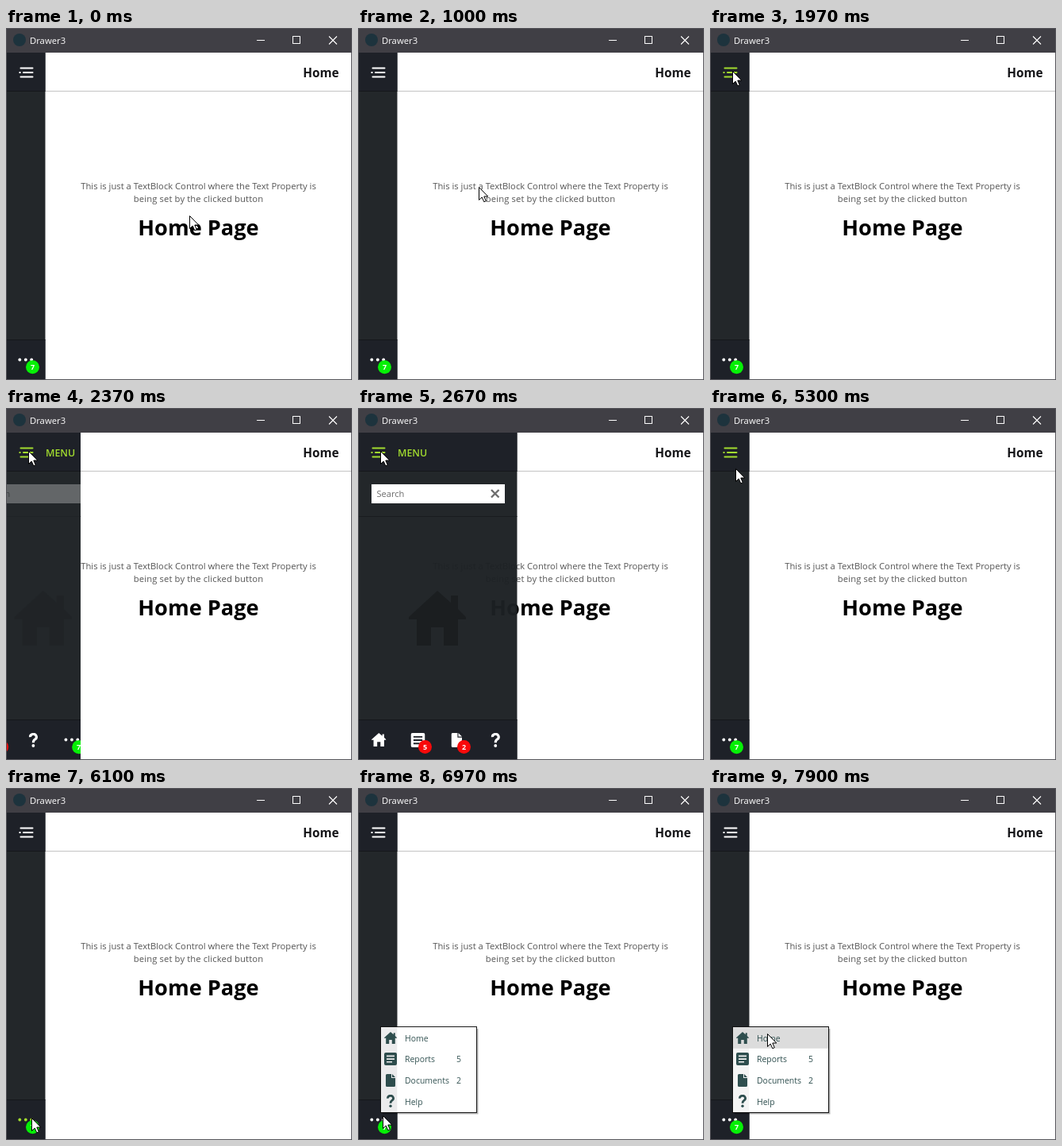
Animation, 436 px wide and 443 px high, one loop 8 s. Source, as an HTML page:

```html
<!DOCTYPE html>
<html lang="en">
<head>
<meta charset="utf-8">
<title>Drawer menu</title>
<style>
  html, body { margin: 0; width: 100%; height: 100%; overflow: hidden; background: #fff; }
  svg { display: block; }
  text { font-family: "Open Sans", "Noto Sans", sans-serif; }
  .mid { text-anchor: middle; }
  .badge { font-size: 9px; font-weight: 700; fill: #fff; text-anchor: middle; }
  .note { font-size: 11.22px; fill: #555; text-anchor: middle; }
  #popup { color: #2f4f4f; }
  #popup text { font-size: 10.45px; fill: #2f4f4f; }
</style>
</head>
<body>
<svg id="stage" width="436" height="443" viewBox="0 0 436 443">
  <defs>
    <symbol id="home" viewBox="0 0 72 69" preserveAspectRatio="none">
      <path fill="currentColor" d="M36 0L53 15V6H62V23L72 33V36H62V69H44V46H28V69H10V36H0V33Z"/>
    </symbol>
    <symbol id="report" viewBox="0 0 16 16">
      <path fill="currentColor" fill-rule="evenodd" d="M2 0H14Q16 0 16 2V14Q16 16 14 16H2Q0 16 0 14V2Q0 0 2 0ZM3 3.5V5.2H13V3.5ZM3 7.2V8.9H13V7.2ZM3 10.9V12.6H10V10.9Z"/>
    </symbol>
    <symbol id="page" viewBox="0 0 12 16">
      <path fill="currentColor" d="M0 1.5Q0 0 1.5 0H7V5H12V14.5Q12 16 10.5 16H1.5Q0 16 0 14.5ZM8 0L12 4H8Z"/>
    </symbol>
    <symbol id="help" viewBox="0 0 10 16">
      <path fill="none" stroke="currentColor" stroke-width="2.8" d="M1.5 4.6A3.5 3.2 0 1 1 6.8 7.2Q5 8.2 5 10.8"/>
      <circle fill="currentColor" cx="5" cy="14.2" r="1.7"/>
    </symbol>
  </defs>

  <!-- window -->
  <rect width="436" height="443" fill="#55545a"/>
  <rect x="1" y="1" width="434" height="30" fill="#403f45"/>
  <rect x="1" y="31" width="434" height="411" fill="#fff"/>
  <circle cx="17" cy="15" r="8" fill="#1d333d"/>
  <text x="30" y="20" font-size="11.3" fill="#fff">Drawer3</text>
  <g fill="none" stroke="#fff">
    <path d="M316 15.5H326"/>
    <rect x="361.5" y="10.5" width="9" height="9"/>
    <path d="M407 10.5L417 20.5M417 10.5L407 20.5" stroke-width="1.1"/>
  </g>

  <!-- page -->
  <rect x="49" y="79" width="386" height="1" fill="#c4c4c4"/>
  <text x="419.5" y="62" text-anchor="end" font-size="15.3" font-weight="700" fill="#151518">Home</text>
  <text class="note" x="242.5" y="203">This is just a TextBlock Control where the Text Property is</text>
  <text class="note" x="242.5" y="219" letter-spacing=".14">being set by the clicked button</text>
  <text class="mid" x="242.5" y="261" font-size="27.2" font-weight="700">Home Page</text>

  <!-- sidebar, clipped to its width -->
  <svg id="side" x="1" y="31" width="48.5" height="411">
    <g transform="translate(-1 -31)">
      <rect y="31" width="201" height="412" fill="#1c2024" fill-opacity=".97"/>
      <rect y="31" width="201" height="48" fill="#1e2128"/>
      <rect y="79" width="201" height="1" fill="#15171b"/>
      <g id="burger" stroke-width="2" stroke-linecap="round">
        <path d="M18.5 50.5H33.5M22 56H33.5M18.5 61.5H33.5M17.3 56H17.8"/>
      </g>
      <text x="50" y="61" font-size="12.4" font-weight="600" fill="#a2dc2f">MENU</text>
      <g id="content">
        <rect x="-40" y="136" width="280" height="1" fill="#191c1f"/>
        <rect x="17" y="96" width="168" height="24" fill="#fff"/>
        <text x="23.5" y="112" font-size="11.1" fill="#6d6d6d">Search</text>
        <path d="M168 103L177.5 112.5M177.5 103L168 112.5" stroke="#6d6d6d" stroke-width="2.4"/>
        <use href="#home" x="64" y="230" width="72" height="69" color="#1b1e20"/>
      </g>
      <rect y="392" width="201" height="51" fill="#1e2128"/>
      <rect y="392" width="201" height="1" fill="#15171b"/>
      <g id="strip" color="#fff">
        <use href="#home" x="17" y="409" width="18.5" height="17"/>
        <use href="#report" x="66.5" y="409" width="18" height="18"/>
        <use href="#page" x="117.5" y="409" width="13.5" height="18"/>
        <use href="#help" x="167.5" y="409" width="11.5" height="18"/>
        <g id="dots">
          <circle cx="214.3" cy="417.5" r="1.9"/>
          <circle cx="221.8" cy="417.5" r="1.9"/>
          <circle cx="229.2" cy="417.5" r="1.9"/>
        </g>
        <circle cx="84.5" cy="426.5" r="8.5" fill="#f80a0a"/>
        <text class="badge" x="84.5" y="430">5</text>
        <circle cx="133.5" cy="426.5" r="8.5" fill="#f80a0a"/>
        <text class="badge" x="133.5" y="430">2</text>
        <circle cx="230.5" cy="426.8" r="8.5" fill="#06f006"/>
        <text class="badge" x="230.5" y="430.3">7</text>
      </g>
    </g>
  </svg>

  <!-- overflow menu -->
  <g id="popup" opacity="0">
    <rect x="31" y="303" width="120.5" height="107.5" fill="#000" opacity=".3"/>
    <rect x="28.5" y="300.5" width="121" height="108" fill="#fff" stroke="#111"/>
    <rect x="29" y="301" width="20" height="107" fill="#f4f4f4"/>
    <rect id="hover" x="29" width="120" height="26.75" fill="#dcdcdc"/>
    <use href="#home" x="33" y="307" width="16" height="15"/>
    <use href="#report" x="33" y="333" width="16" height="16"/>
    <use href="#page" x="35" y="360" width="12" height="16"/>
    <use href="#help" x="36" y="386" width="10" height="16"/>
    <text x="59" y="319">Home</text>
    <text x="59" y="345">Reports</text>
    <text x="59" y="372">Documents</text>
    <text x="59" y="399">Help</text>
    <text x="124" y="345">5</text>
    <text x="124" y="372">2</text>
  </g>

  <path id="cursor" d="M.5 .5V16.5L4.2 13L6.8 18.8L9.3 17.7L6.8 12H11.8Z" fill="#fff" stroke="#000"/>
</svg>

<script>
const LOOP = 8000;
const GREEN = '#a2dc2f';
const $ = id => document.getElementById(id);
const el = {};
for (const id of ['side', 'burger', 'content', 'strip', 'dots', 'popup', 'hover', 'cursor']) el[id] = $(id);

// rows: time, values...
const pointer = [
  [100, 231, 236], [240, 221, 250], [370, 214, 266], [740, 214, 266],
  [900, 187, 238], [1150, 100, 144], [1380, 42, 72], [1530, 29, 56],
  [1640, 29, 56], [1670, 28, 57], [1870, 28, 57], [1970, 27.5, 54],
  [5270, 27.5, 54], [5300, 31.5, 75], [5450, 39, 150], [5700, 42, 300],
  [5900, 39, 385], [6100, 32, 415], [6250, 30, 409], [6430, 30.5, 412],
  [7270, 30.5, 412], [7400, 38, 395], [7600, 58, 350], [7800, 71, 314], [7900, 72, 309]
];
const closed = [[2250, 1], [2660, 0], [3760, 0], [4195, 1]];
const fade = [[6770, 0], [6970, .96], [7050, 1]];

function at(rows, t) {
  if (t <= rows[0][0]) return rows[0].slice(1);
  const i = rows.findIndex(r => r[0] > t);
  if (i < 0) return rows[rows.length - 1].slice(1);
  const a = rows[i - 1], b = rows[i];
  const k = (t - a[0]) / (b[0] - a[0]);
  return a.slice(1).map((v, j) => v + (b[j + 1] - v) * k);
}

const set = (node, name, value) => node.setAttribute(name, value);
const shift = (node, x, y) => set(node, 'transform', `translate(${x} ${y})`);

function draw(t) {
  const [x, y] = at(pointer, t);
  const [p] = at(closed, t);
  const [shown] = at(fade, t);
  const inSide = x < 49;

  set(el.side, 'width', 199.5 - 151 * p);
  shift(el.content, -75.5 * p, 0);
  set(el.content, 'opacity', 1 - p);
  shift(el.strip, -197 * p, 0);

  set(el.burger, 'stroke', inSide && y < 79 ? GREEN : '#fff');
  set(el.dots, 'fill', inSide && y > 392 && !shown ? GREEN : '#fff');

  const row = Math.floor((y - 301) / 26.75);
  const over = shown > 0 && row >= 0 && row < 4;
  set(el.popup, 'opacity', shown);
  set(el.hover, 'opacity', over ? 1 : 0);
  set(el.hover, 'y', 301 + 26.75 * row);

  shift(el.cursor, Math.round(x), Math.round(y));
}

function tick(now) {
  draw(now % LOOP);
  requestAnimationFrame(tick);
}
draw(0);
requestAnimationFrame(tick);
</script>
</body>
</html>
```
